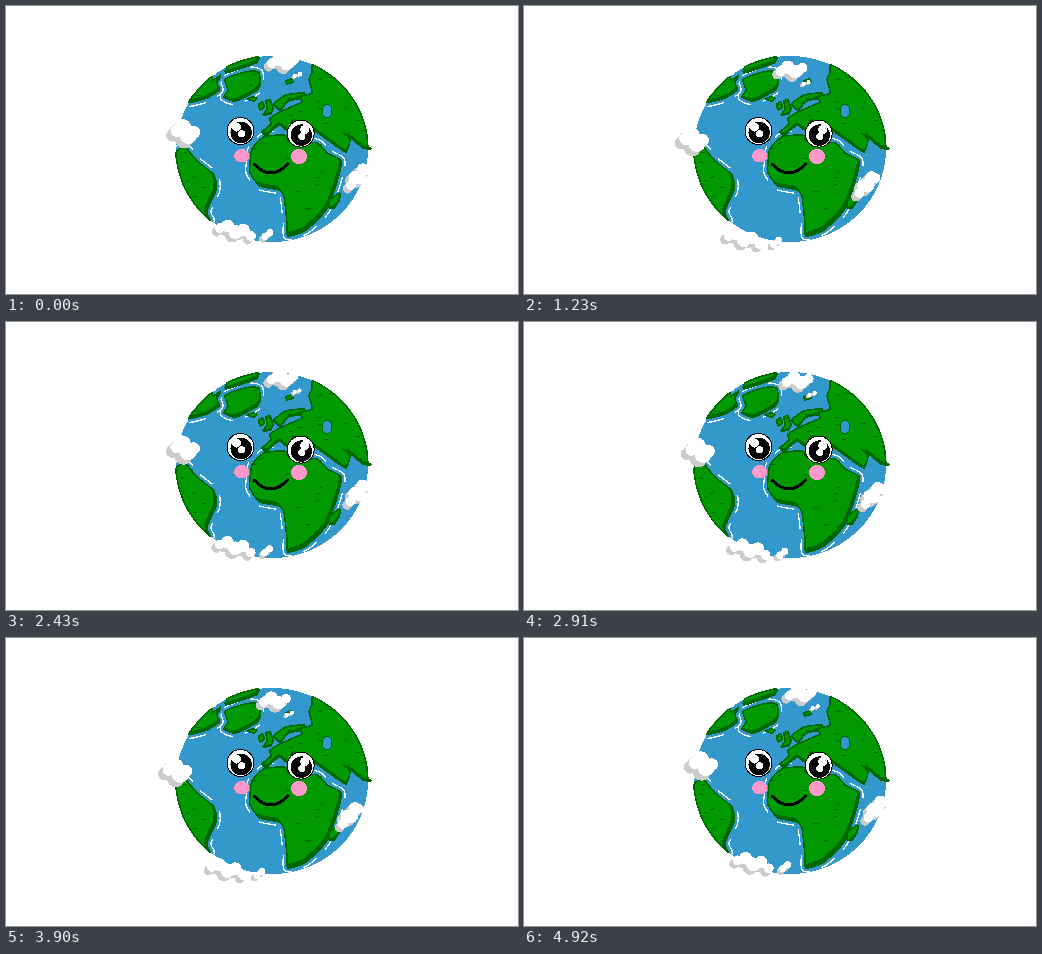
Animation of 512 by 288 pixels, one loop 4.95 s. Source, as an HTML page:

```html
<!DOCTYPE html>
<html lang="en">
<head>
<meta charset="utf-8">
<title>Happy planet</title>
<style>
html, body { margin: 0; width: 100%; height: 100%; overflow: hidden; background: #fff; }
svg { display: block; width: 512px; height: 288px; }
</style>
</head>
<body>
<svg viewBox="0 0 512 288" shape-rendering="crispEdges">
  <defs id="defs"></defs>
  <g id="sea"></g>
  <g id="land"></g>
  <g id="face">
    <ellipse cx="235.8" cy="149.7" rx="7.7" ry="6.7" fill="#ff99cc"/>
    <ellipse cx="293" cy="150.5" rx="8" ry="7.5" fill="#ff99cc"/>
    <g id="leftEye"></g>
    <g id="rightEye"></g>
    <g fill="none" stroke="#000" stroke-linecap="round" stroke-linejoin="round">
      <path id="smile" d="M248 158Q265 176 281.5 158" stroke-width="3"/>
      <path id="wink" d="M300 116L285 128L308 131.5" stroke-width="5"/>
    </g>
    <circle id="kiss" cx="250" cy="160" r="5.4"/>
  </g>
  <g id="clouds"></g>
</svg>
<script>
const LOOP = 4950, STEP = 30, SWAY = LOOP / 2;
const DRIFT = { x: -9.5, y: 8 };
const WINK = { from: 4110, to: 4650 };
const GLOBE = { cx: 266, cy: 143, rx: 96, ry: 93 };
const BLUE = "#3399cc", GREEN = "#009900", DARK = "#006600", GREY = "#cccccc";
const $ = id => document.getElementById(id);

function add(parent, tag, attrs) {
  const el = document.createElementNS("http://www.w3.org/2000/svg", tag);
  for (const key in attrs) el.setAttribute(key, attrs[key]);
  parent.appendChild(el);
  return el;
}

let seed = 7;
const random = () => (seed = seed * 16807 % 2147483647) / 2147483647;

const parse = text => text.trim().split(/\s+/).map(pair => pair.split(",").map(Number));

// Points along the globe's rim between two angles in degrees.
function rim(from, to) {
  const count = Math.ceil(Math.abs(to - from) / 8);
  return Array.from({ length: count + 1 }, (_, i) => {
    const a = (from + (to - from) * i / count) * Math.PI / 180;
    return [GLOBE.cx + GLOBE.rx * Math.cos(a), GLOBE.cy + GLOBE.ry * Math.sin(a)];
  });
}

// Closed curve through the points; tight enough to keep capes sharp.
function curve(points) {
  const n = points.length, at = i => points[(i + n) % n];
  const lean = (i, sign) => at(i).map((v, k) => v + sign * (at(i + 1)[k] - at(i - 1)[k]) / 9);
  return "M" + at(0) + points.map((_, i) => `C${lean(i, 1)} ${lean(i + 1, -1)} ${at(i + 1)}`).join("") + "Z";
}

const coast = (shade, points, surf) => ({ shade, points, surf, d: curve(points) });

const coasts = [
  coast([-1, -3], [...rim(210, 231), ...parse("207,74 215,69 211,77 213,84 201,92")], true),
  coast([-1, -3], [...rim(242, 262), ...parse("250,57 236,62 220,67")]),
  coast([-1, -3], parse("219,74 229,69 245,65 253,67 254,79 250,85 230,95 218,91 222,84"), true),
  coast([0, -1], parse("241,93 246,91 251,92 248,95")),
  coast([0, -1], parse("253,98 257,96 258,101 254,104")),
  coast([0, -2], parse("260,95 264,94 267,103 264,108 257,109 261,103")),
  coast([0, -2], parse("268,98 280,89 298,87 296,92 283,95 274,104")),
  coast([0, -1], parse("280,75 285,73 287,76 281,78")),
  coast([0, -3], [...rim(-65, -2), ...parse(`365,143 357,142 346,133 338,127 344,134 340,146 330,140
    312,127 298,119 286,116 282,125 273,119 261,129 256,126 265,118 264,112 276,105 296,96
    292,91 306,87 303,74 306,66`)]),
  coast([-2, -4], parse(`244,158 246,143 258,131 279,129 283,135 311,137 321,147 335,155 331,176
    320,204 300,224 282,230 281,217 278,191 273,184 254,180 244,167`), true),
  coast([-1, -2], parse("323,202 324,194 334,187 333,195 328,202")),
  coast([-3, -2], [...rim(130, 178), ...parse("179,141 191,155 208,169 210,184 201,205")], true)
];

function drawSea() {
  add(add($("defs"), "clipPath", { id: "globe" }), "ellipse", GLOBE);
  const sea = $("sea");
  add(sea, "ellipse", { ...GLOBE, fill: BLUE });
  const waves = add(sea, "g", { fill: "none", "clip-path": "url(#globe)" });
  const shores = coasts.filter(c => c.surf);
  // A blue band over a wider broken white one leaves thin surf lines.
  for (const { d } of shores) add(waves, "path", { d, stroke: "#fff", "stroke-width": 9, "stroke-dasharray": "16 11" });
  for (const { d } of shores) add(waves, "path", { d, stroke: BLUE, "stroke-width": 6.4 });
}

function drawLand({ shade, points, d }, i) {
  const land = $("land");
  add(add($("defs"), "clipPath", { id: "coast" + i }), "path", { d });
  add(land, "path", { d, fill: DARK });
  const lit = add(land, "g", { "clip-path": `url(#coast${i})` });
  add(lit, "path", { d, fill: GREEN, transform: `translate(${shade})` });

  const [xs, ys] = [0, 1].map(k => points.map(p => p[k]));
  const left = Math.min(...xs), top = Math.min(...ys);
  const w = Math.max(...xs) - left, h = Math.max(...ys) - top;
  for (let k = 0; k < w * h / 330; k++)
    add(lit, "path", {
      d: `M${left + w * random()} ${top + h * random()}l4 ${2 * random() - 1}`,
      stroke: DARK, "stroke-width": 1
    });
  add(land, "path", { d, fill: "none", stroke: DARK, "stroke-width": 1.5, "stroke-linejoin": "round" });
}

function drawEye(group, x, y, side) {
  const dot = (dx, dy, r, fill) => add(group, "circle", { cx: x + dx, cy: y + dy, r, fill });
  dot(0, 0, 14, "#000");
  dot(0, 0, 13, "#fff");
  dot(.7, 1.5, 10.7, "#000");
  dot(4 * side, -4, 4.5, "#fff");
  dot(1.2, 2.8, 3.6, "#fff");
}

// A row of puffs, swelling in the middle and alternating up and down.
function drawCloud([x1, y1], [x2, y2], count, size) {
  const puffs = Array.from({ length: count }, (_, i) => {
    const u = count > 1 ? i / (count - 1) : .5;
    return {
      cx: x1 + (x2 - x1) * u,
      cy: y1 + (y2 - y1) * u + (i % 2 ? -1 : 1) * size * .3,
      r: size * (.7 + .3 * Math.sin(Math.PI * u))
    };
  });
  const drop = size * .5;
  for (const [fill, shift] of [[GREY, [-drop, drop]], ["#fff", [0, 0]]])
    for (const puff of puffs)
      add($("clouds"), "circle", { ...puff, fill, transform: `translate(${shift})` });
}

drawSea();
coasts.forEach(drawLand);
add($("land"), "ellipse", { cx: 321, cy: 105, rx: 5, ry: 6.5, fill: BLUE, stroke: DARK });
drawEye($("leftEye"), 234.5, 125, -1);
drawEye($("rightEye"), 294.7, 127.6, 1);
drawCloud([171, 122], [188, 129], 4, 9);
drawCloud([266, 55], [288, 56], 4, 7);
drawCloud([289, 69], [294, 69], 2, 3);
drawCloud([345, 177], [361, 162], 5, 7);
drawCloud([214, 220], [245, 228], 5, 7);
drawCloud([259, 229], [264, 228], 2, 5);

const show = (id, on) => $(id).setAttribute("visibility", on ? "visible" : "hidden");

function draw(ms) {
  const t = Math.floor((ms % LOOP) / STEP) * STEP;
  const reach = 1 - Math.abs(1 - 2 * (t % SWAY) / SWAY);
  $("clouds").setAttribute("transform", `translate(${DRIFT.x * reach} ${DRIFT.y * reach})`);
  const winking = t >= WINK.from && t < WINK.to;
  show("rightEye", !winking);
  show("smile", !winking);
  show("wink", winking);
  show("kiss", winking);
}

const start = performance.now();
function tick() {
  draw(performance.now() - start);
  requestAnimationFrame(tick);
}
tick();
</script>
</body>
</html>
```
